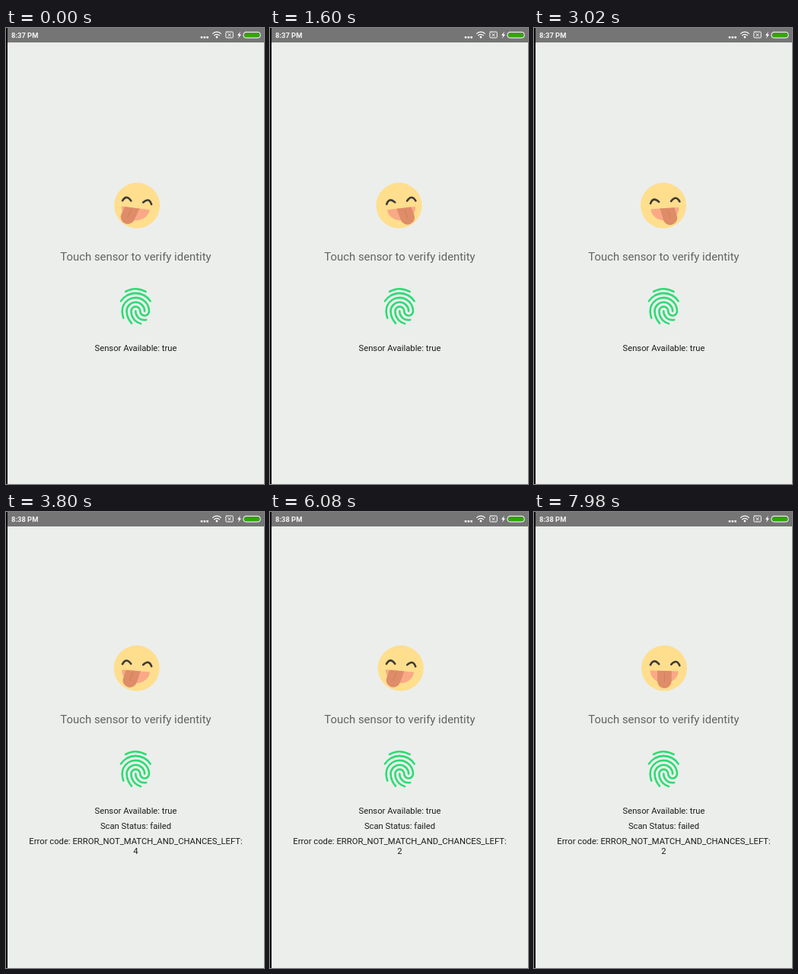
Write an HTML page that moves like this. It is 339 by 600 pixels and loops after 8000 ms.

```html
<!DOCTYPE html>
<html lang="en">
<head>
<meta charset="utf-8">
<title>Fingerprint check</title>
<style>
html, body { margin: 0; width: 100%; height: 100%; overflow: hidden; background: #ebeeeb; }
svg { display: block; width: 100%; height: 100%; }
text { font-family: Roboto, "Noto Sans", sans-serif; }
.info { font-size: 11.25px; fill: #1c1c1c; text-anchor: middle; }
.line { fill: none; stroke-linecap: round; stroke-linejoin: round; }
</style>
</head>
<body>
<svg viewBox="0 0 339 600">
  <defs>
    <clipPath id="belowLip"><rect x="-40" y="0" width="80" height="60"/></clipPath>
  </defs>
  <rect width="339" height="600" fill="#ebeeeb"/>
  <rect width="339" height="19" fill="#757575"/>
  <rect width="2" height="600" fill="#0c0c0c"/>

  <text id="clock" x="7" y="12.8" font-size="9.4" font-weight="700" fill="#f4f4f4"></text>
  <g fill="#fff">
    <rect x="255.8" y="11" width="2.5" height="2.5"/>
    <rect x="259.6" y="11" width="2.5" height="2.5"/>
    <rect x="263.4" y="11" width="2.5" height="2.5"/>
    <circle cx="277" cy="12" r="1.4"/>
    <path d="M308 4.8l-4 4.9h2.3l-1.2 4 4-5.2h-2.3z"/>
  </g>
  <g class="line" stroke="#fff" stroke-width="1.2">
    <path d="M271.6 7.4q5.4-4.4 10.8 0M273.6 9.7q3.4-2.8 6.8 0"/>
    <rect x="288.9" y="5.1" width="9.4" height="7.8" rx="1.2" stroke-width="1"/>
    <path d="M292 7.5l3.2 3.2m0-3.2l-3.2 3.2" stroke-width="1"/>
    <rect x="312" y="5.4" width="22.2" height="7.6" rx="3.2" stroke-width="1"/>
  </g>
  <rect x="313" y="6.4" width="20.2" height="5.6" rx="2.2" fill="#2fa800"/>

  <g id="page">
    <circle id="head" cy="233.6" r="30" fill="#ffde8d"/>
    <g id="features">
      <g class="line" stroke="#3d3b38" stroke-width="2.6">
        <path d="M-19.2 1q4.2-9.2 11.2-1.2"/>
        <path d="M8-.2q7-8 11.2 1.2"/>
      </g>
      <g transform="translate(-.8 8.5)">
        <path d="M-18.6 0H18.6C18.4 9 10 16.2 0 16.2S-18.4 9-18.6 0z" fill="#f9a986"/>
        <g clip-path="url(#belowLip)">
          <g id="tongue">
            <path d="M-9.3-10H9.3V13.5a9.3 9.3 0 0 1-18.6 0z" fill="#de8d68"/>
            <path d="M0 3V14" class="line" stroke="#d2805d" stroke-width="1.2"/>
          </g>
        </g>
      </g>
    </g>
    <text x="170.5" y="305.6" font-size="14.9" fill="#626462" text-anchor="middle">Touch sensor to verify identity</text>
    <g class="line" stroke="#2bdc74" transform="translate(229.4 427.4) scale(1.78)" stroke-width="1.45">
      <path d="M-25.7-45.2c-2.3-1.3-4.7-2.1-7.6-2.1s-5.2.8-7.3 2.1"/>
      <path d="M-44.1-38.2c1.2-1.8 2.7-3.2 4.6-4.3 1.9-1 4-1.6 6.3-1.6s4.4.6 6.3 1.6c1.9 1 3.4 2.5 4.6 4.3"/>
      <path d="M-42.2-25.7c-.8-2.1-.9-3.9-.9-5.1 0-1.5.25-2.85.8-4.1 1.6-3.45 5.05-5.85 9.1-5.85 5.5 0 9.95 4.45 9.95 9.95a3.3 3.3 0 0 1-6.6 0 3.3 3.3 0 0 0-6.65 0c0 2.55 1 4.9 2.6 6.6 1.2 1.3 2.45 2.1 4.5 2.7"/>
      <path d="M-36.15-21.8c-1-1.2-1.55-1.9-2.35-3.5-.85-1.65-1.3-3.5-1.3-5.5a6.63 6.63 0 0 1 13.26 0"/>
      <path d="M-25.35-24.4c-.6.1-1.15.15-1.45.15-1.3 0-2.55-.35-3.65-1.15-1.65-1.2-2.75-3.15-2.75-5.4"/>
    </g>
    <text class="info" x="170.5" y="425">Sensor Available: true</text>
    <g id="result">
      <text class="info" x="170.5" y="445">Scan Status: failed</text>
      <text class="info" x="170.5" y="465">Error code: ERROR_NOT_MATCH_AND_CHANCES_LEFT:</text>
      <text class="info" x="170.5" y="478.3" id="chances"></text>
    </g>
  </g>
</svg>
<script>
const LOOP = 8000, SWING = 1150;
const FAIL = 3160, SKIP = 3300, LOST = 230, SECOND = 5100, THIRD = 5560;
const el = id => document.getElementById(id);
const [clock, page, head, features, tongue, result, chances] =
  ["clock", "page", "head", "features", "tongue", "result", "chances"].map(el);
const wave = turns => Math.cos(turns * 2 * Math.PI);

function draw(t) {
  // The swing falls behind at the skip
  const turns = (t < SKIP ? t : t - LOST) / SWING;
  const sway = wave(turns + 0.04), wag = wave(turns);
  const failed = t >= FAIL;

  head.setAttribute("cx", 170.8 + 1.4 * sway);
  features.setAttribute("transform", `translate(172.2 228.6) rotate(${7.5 * sway})`);
  tongue.setAttribute("transform", `translate(${-4.5 * wag} 0) rotate(${18 * wag})`);

  page.setAttribute("transform", `translate(0 ${failed ? -28 : 0})`);
  result.setAttribute("visibility", failed ? "visible" : "hidden");
  clock.textContent = failed ? "8:38 PM" : "8:37 PM";
  chances.textContent = t < SECOND ? 4 : t < THIRD ? 3 : 2;
}

const start = performance.now();
function tick() {
  draw((performance.now() - start) % LOOP);
  requestAnimationFrame(tick);
}
draw(0);
requestAnimationFrame(tick);
</script>
</body>
</html>
```
